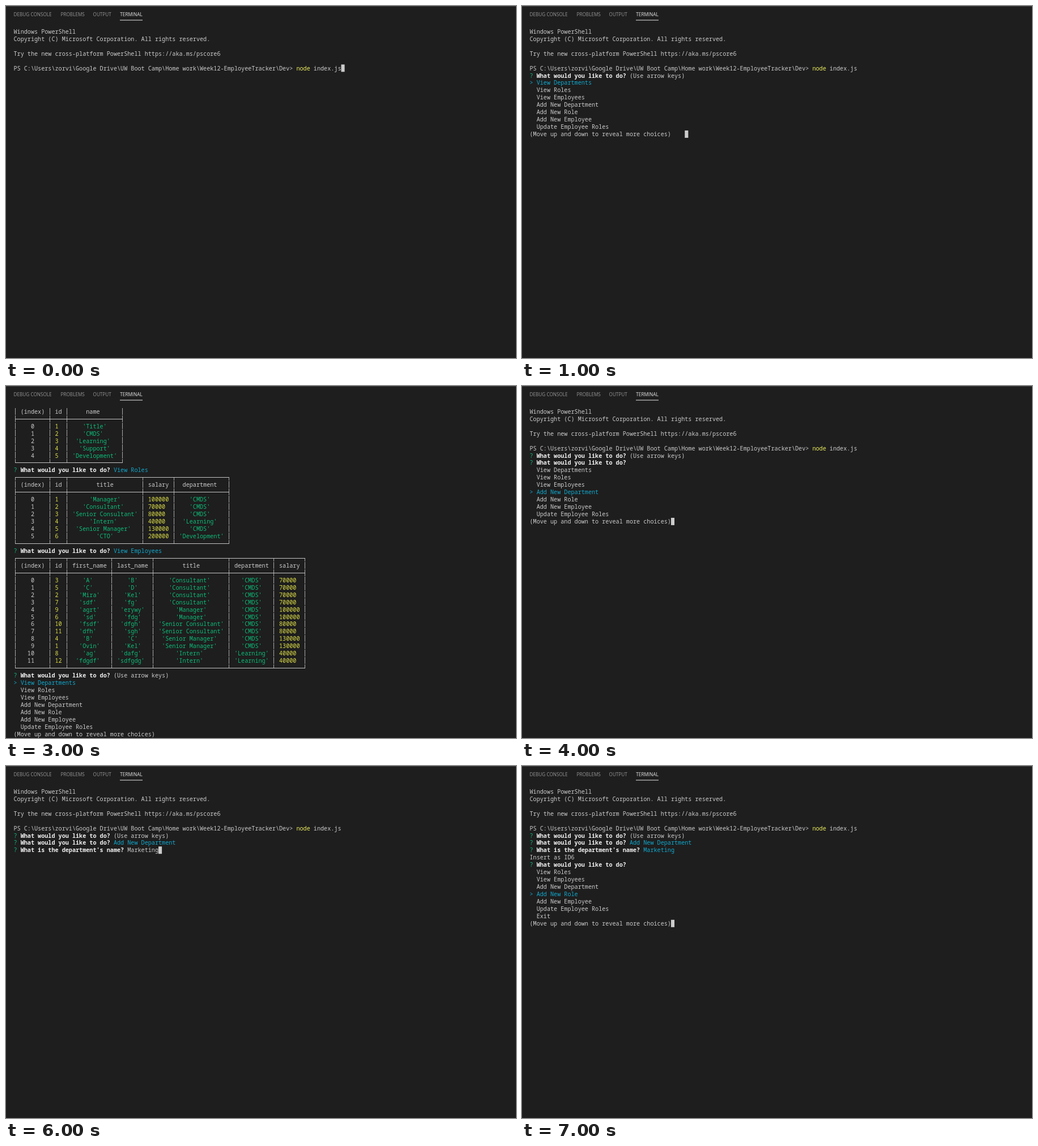
These frames come from a looping animation (900x622 px, 8 s). An HTML page with a canvas:

```html
<!DOCTYPE html>
<html lang="en">
<head>
<meta charset="utf-8">
<title>Employee tracker terminal</title>
<style>
  html, body { margin: 0; height: 100%; overflow: hidden; background: #1e1e1e; }
  canvas { display: block; }
</style>
</head>
<body>
<canvas id="stage" width="900" height="622"></canvas>
<script>
const ctx = document.getElementById('stage').getContext('2d');

const TEXT = '#cccccc', WHITE = '#f0f0f0', GREEN = '#0dbc79', CYAN = '#11a8cd',
      YELLOW = '#dede4a', COMMAND = '#f0f060', RULE = '#c4c4c4', BAR = '#a8a8a8';
const LEFT = 13.5, TOP = 38.6, CELL_W = 6.084, CELL_H = 12.955, ROWS = 45, BASELINE = 10.2;
const MONO = '10.14px "Noto Sans Mono", monospace';

// A line is a list of [text, colour, bold] segments.
const plain = text => [[text, TEXT]];
const ask = (question, answer = '', colour = CYAN) =>
  [['? ', GREEN], [question + ' ', WHITE, true], [answer, colour]];

const TODO = 'What would you like to do?';
const DEPARTMENT = "What is the department's name?";
const OPTIONS = ['View Departments', 'View Roles', 'View Employees', 'Add New Department',
                 'Add New Role', 'Add New Employee', 'Update Employee Roles', 'Exit'];

function menu(selected, first = 0) {
  const items = OPTIONS.slice(first, first + 7).map((name, i) =>
    first + i === selected ? [['> ' + name, CYAN]] : plain('  ' + name));
  return [...items, plain('(Move up and down to reveal more choices)')];
}

function table(headers, records) {
  const heads = ['(index)', ...headers];
  const rows = records.map((record, i) =>
    [String(i), ...record.map(v => typeof v === 'string' ? `'${v}'` : v)]);
  const widths = heads.map((head, c) =>
    2 + Math.max(head.length, ...rows.map(row => String(row[c]).length)));
  const rule = ([start, cross, end]) =>
    plain(start + widths.map(w => '─'.repeat(w)).join(cross) + end);
  const line = (cells, colour) => [['│', TEXT], ...cells.flatMap((value, c) => {
    const text = String(value), gap = Math.floor((widths[c] - text.length) / 2);
    return [[(' '.repeat(gap) + text).padEnd(widths[c]), colour(value)], ['│', TEXT]];
  })];
  const cellColour = v => typeof v === 'number' ? YELLOW : v[0] === "'" ? GREEN : TEXT;
  return [rule('┌┬┐'), line(heads, () => TEXT), rule('├┼┤'),
          ...rows.map(row => line(row, cellColour)), rule('└┴┘')];
}

const roles = [
  ['Manager', 100000, 'CMDS'], ['Consultant', 70000, 'CMDS'],
  ['Senior Consultant', 80000, 'CMDS'], ['Intern', 40000, 'Learning'],
  ['Senior Manager', 130000, 'CMDS'], ['CTO', 200000, 'Development']
];
const employees = [
  [3, 'A', 'B', 1], [5, 'C', 'D', 1], [2, 'Mira', 'Kel', 1], [7, 'sdf', 'fg', 1],
  [9, 'agrt', 'erywy', 0], [6, 'sd', 'fdg', 0], [10, 'fsdf', 'dfgh', 2], [11, 'dfh', 'sgh', 2],
  [4, 'B', 'C', 4], [1, 'Ovin', 'Kel', 4], [8, 'ag', 'dafg', 3], [12, 'fdgdf', 'sdfgdg', 3]
];
const departmentTable = table(['id', 'name'],
  ['Title', 'CMDS', 'Learning', 'Support', 'Development'].map((name, i) => [i + 1, name]));
const roleTable = table(['id', 'title', 'salary', 'department'],
  roles.map((role, i) => [i + 1, ...role]));
const employeeTable = table(['id', 'first_name', 'last_name', 'title', 'department', 'salary'],
  employees.map(([id, first, last, role]) => {
    const [title, salary, department] = roles[role];
    return [id, first, last, title, department, salary];
  }));

const shell = [
  plain('Windows PowerShell'),
  plain('Copyright (C) Microsoft Corporation. All rights reserved.'),
  [],
  plain('Try the new cross-platform PowerShell https://aka.ms/pscore6'),
  [],
  [['PS C:\\Users\\zorvi\\Google Drive\\UW Boot Camp\\Home work\\Week12-EmployeeTracker\\Dev> ', TEXT],
   ['node', COMMAND], [' index.js', TEXT]]
];
const hint = ask(TODO, '(Use arrow keys)', TEXT);
const started = [...shell, hint];
const listed = [...started, ask(TODO, OPTIONS[0]), ...departmentTable];
const adding = [...started, ask(TODO, OPTIONS[3])];

// One scene per second; the cursor is a column on the last line, or null while blinked off.
const scenes = [
  { lines: shell, cursor: 95 },
  { lines: [...started, ...menu(0)], cursor: 45 },
  { lines: [...listed, hint, ...menu(0)], cursor: 45 },
  { lines: [...listed, ask(TODO, OPTIONS[1]), ...roleTable,
            ask(TODO, OPTIONS[2]), ...employeeTable, hint, ...menu(0)], cursor: null },
  { lines: [...started, ask(TODO), ...menu(3)], cursor: 41 },
  { lines: [...adding, ask(DEPARTMENT)], cursor: 33 },
  { lines: [...adding, ask(DEPARTMENT, 'Marketing', TEXT)], cursor: 42 },
  { lines: [...adding, ask(DEPARTMENT, 'Marketing'), plain('Insert as ID6'),
            ask(TODO), ...menu(4, 1)], cursor: 41 }
];

function rect(x, y, w, h, colour) {
  ctx.fillStyle = colour;
  ctx.fillRect(x, y, w, h);
}

function drawBox(char, col, row) {
  const x0 = Math.round(LEFT + col * CELL_W), x1 = Math.round(LEFT + (col + 1) * CELL_W);
  const y0 = Math.round(TOP + row * CELL_H), y1 = Math.round(TOP + (row + 1) * CELL_H);
  const x = Math.floor(LEFT + (col + 0.5) * CELL_W), y = Math.floor(TOP + (row + 0.5) * CELL_H);
  if ('│├┼┤└┴┘'.includes(char)) rect(x, y0, 1, y - y0 + 1, BAR);
  if ('│┌┬┐├┼┤'.includes(char)) rect(x, y, 1, y1 - y - 1, BAR);
  if ('─┬┐┼┤┴┘'.includes(char)) rect(x0, y, x - x0 + 1, 1, RULE);
  if ('─┌┬├┼└┴'.includes(char)) rect(x, y, x1 - x, 1, RULE);
}

function drawLine(segments, row) {
  let col = 0;
  for (const [text, colour, bold] of segments) {
    ctx.font = (bold ? 'bold ' : '') + MONO;
    for (const char of text) {
      if ('─│┌┬┐├┼┤└┴┘'.includes(char)) drawBox(char, col, row);
      else if (char !== ' ') {
        ctx.fillStyle = colour;
        ctx.fillText(char, LEFT + col * CELL_W, Math.round(TOP + row * CELL_H + BASELINE));
      }
      col++;
    }
  }
}

function drawTabs() {
  rect(0, 0, 900, 1, '#414141');
  ctx.font = '8.2px "Open Sans", sans-serif';
  const tabs = [['DEBUG CONSOLE', 13.5], ['PROBLEMS', 96.5], ['OUTPUT', 153.5], ['TERMINAL', 201.3]];
  for (const [name, x] of tabs) {
    ctx.fillStyle = name === 'TERMINAL' ? '#e7e7e7' : '#979797';
    ctx.fillText(name, x, 18);
  }
  rect(201, 24.5, 40, 1, '#e7e7e7');
}

function draw(now) {
  const { lines, cursor } = scenes[Math.floor(now % 8000 / 1000)];
  const visible = lines.slice(-ROWS);
  rect(0, 0, 900, 622, '#1e1e1e');
  drawTabs();
  visible.forEach(drawLine);
  if (cursor !== null) {
    rect(LEFT + cursor * CELL_W, TOP + (visible.length - 1) * CELL_H, CELL_W, CELL_H, TEXT);
  }
}

const start = performance.now();
function tick() {
  draw(performance.now() - start);
  requestAnimationFrame(tick);
}
tick();
</script>
</body>
</html>
```
